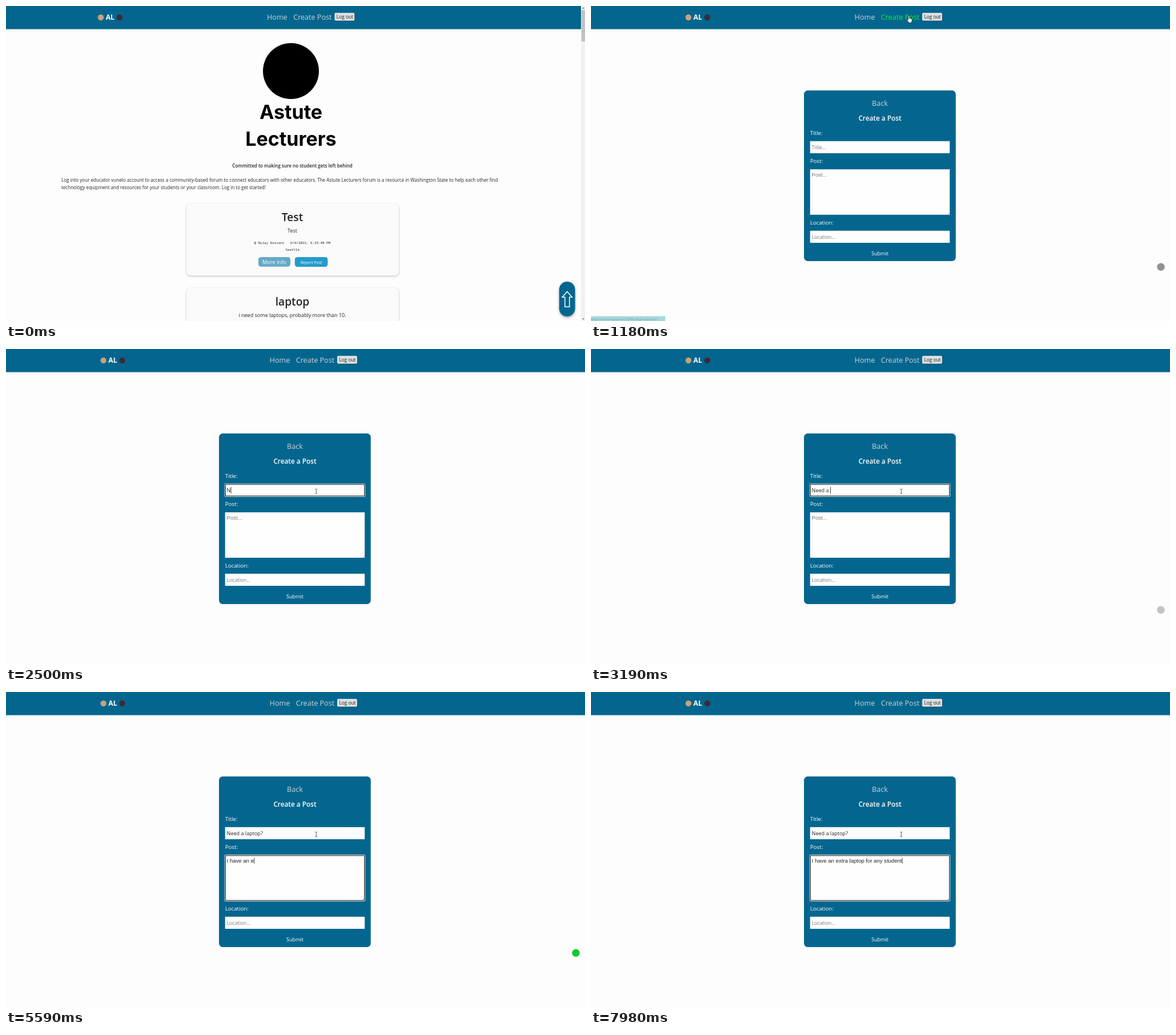
These frames come from a looping animation (1014 px wide and 552 px high, 8000 ms). An HTML page:

```html
<!DOCTYPE html>
<html lang="en">
<head>
<meta charset="utf-8">
<title>Forum walkthrough</title>
<style>
  html, body { margin: 0; width: 100%; height: 100%; overflow: hidden; background: #fdfdfd; }
  svg { display: block; width: 1014px; height: 552px; }
  text { font-family: "Open Sans", "Noto Sans", sans-serif; white-space: pre; }
  .mid { text-anchor: middle; }
  .link { font-size: 12.6px; fill: #ccd3d8; }
  .small { font-size: 8.06px; fill: #212529; }
  .h { font-size: 19.2px; font-weight: 600; fill: #212529; }
  .sub { font-size: 9.03px; fill: #212529; }
  .mono { font: 5.85px "Noto Sans Mono", "Liberation Mono", monospace; fill: #212529; }
  .big { font: 700 34px Inter, "Open Sans", sans-serif; fill: #000; }
  .label { font-size: 9.7px; font-weight: 500; fill: #fff; }
  .field { font-size: 9.05px; fill: #222; }
  .area { font: 9.57px "Liberation Sans", Arial, sans-serif; fill: #222; }
  .hint { fill: #777; }
  .card { fill: #fafafa; filter: drop-shadow(0 1.5px 1.5px rgba(0,0,0,.28)); }
</style>
</head>
<body>
<svg viewBox="0 0 1014 552">
  <rect width="1014" height="552" fill="#fdfdfd"/>
  <rect width="1014" height="40.6" fill="#04668e"/>

  <g id="nav">
    <circle cx="166" cy="20" r="5.2" fill="#c8a27b"/>
    <text x="174.7" y="24.3" font-size="12.2" font-weight="700" fill="#fff">AL</text>
    <circle cx="199" cy="20" r="5.2" fill="#3d2a34"/>
    <text class="link" x="457" y="24.4">Home</text>
    <text class="link" id="create" x="503.2" y="24.4">Create Post</text>
    <rect x="575.6" y="12.3" width="35.6" height="14.2" rx="2" fill="#27404c"/>
    <rect x="575.4" y="12.1" width="35" height="13.6" rx="2" fill="#dcdfe1"/>
    <text class="mid" x="593.4" y="22.4" font-size="8.3" fill="#222">Log out</text>
  </g>

  <g id="home">
    <circle cx="499" cy="114" r="49" fill="#000"/>
    <text class="big mid" x="499" y="197.5">Astute</text>
    <text class="big mid" x="499" y="244.8">Lecturers</text>
    <text class="small mid" x="501.5" y="282.5" font-weight="600">Committed to making sure no student gets left behind</text>
    <text class="small" x="97" y="308.3">Log into your educator vunelo account to access a community-based forum to connect educators with other educators. The Astute Lecturers forum is a resource in Washington State to help each other find</text>
    <text class="small" x="97" y="321.2">technology equipment and resources for your students or your classroom. Log in to get started!</text>

    <rect class="card" x="316" y="346" width="372" height="126.5" rx="7"/>
    <text class="h mid" x="501.5" y="377.3">Test</text>
    <text class="sub mid" x="501.5" y="396.6">Test</text>
    <text class="mono" x="434.6" y="416.6">@ Nilay Dorvani</text>
    <text class="mono" x="498" y="416.6">6/9/2022, 6:29:40 PM</text>
    <text class="mono mid" x="501.5" y="428.6">Seattle</text>
    <rect x="442" y="440" width="56" height="16.8" rx="4.5" fill="#63aac7"/>
    <text class="mid" x="470" y="451.8" font-size="9.2" fill="#fff">More Info</text>
    <rect x="505.8" y="440" width="57.6" height="17" rx="4.5" fill="#259bcd"/>
    <text class="mid" x="534.6" y="451.6" font-size="6.95" fill="#fff">Report Post</text>

    <rect class="card" x="316" y="494" width="372" height="126.5" rx="7"/>
    <text class="h mid" x="501.5" y="525">laptop</text>
    <text class="sub mid" x="501.5" y="544.6">i need some laptops, probably more than 10.</text>

    <rect x="968.8" y="483" width="27.8" height="61" rx="13.9" fill="#04668e" style="filter:drop-shadow(0 2px 2px rgba(0,0,0,.35))"/>
    <path d="M982.8 500.5l8.6 9.7h-4.6v17h-8v-17h-4.6z" fill="none" stroke="#fff" stroke-width="1.5"/>

    <rect x="1007" width="7" height="552" fill="#f1f1f1"/>
    <rect x="1007.8" y="7" width="6.2" height="55" fill="#c1c1c1"/>
    <path d="M1009 4.5l2-2.2 2 2.2zM1009 547.5l2 2.2 2-2.2z" fill="#666"/>
  </g>

  <g id="form">
    <rect x="373" y="148" width="265.8" height="299" rx="6.5" fill="#04668e"/>
    <text class="link mid" x="506" y="174.6">Back</text>
    <text class="mid" x="506" y="201.2" font-size="11.8" font-weight="600" fill="#fff">Create a Post</text>
    <text class="label" x="383.7" y="226.2">Title:</text>
    <text class="label" x="383.7" y="275.4">Post:</text>
    <text class="label" x="383.7" y="383">Location:</text>
    <g fill="#fefefe">
      <rect x="383.7" y="236.8" width="244.5" height="21.2"/>
      <rect x="383.7" y="286.2" width="244.5" height="79.6"/>
      <rect x="383.7" y="393.8" width="244.5" height="21.2"/>
    </g>
    <path d="M624.5 365l3-3M626.3 365l1.2-1.2" stroke="#888" stroke-width=".6"/>
    <g id="ring" fill="none">
      <rect id="outer" x="383.2" width="245.6" rx="1.2" stroke="#fff"/>
      <rect id="inner" x="384.2" width="243.6" rx=".8" stroke="#111" stroke-width="1.1"/>
    </g>
    <text id="title" x="386.6" y="251"></text>
    <text id="body" x="386.6" y="298.8"></text>
    <text class="field hint" x="386.6" y="408.3" style="font-size:8.7px">Location...</text>
    <rect id="caret" width=".8" fill="#111"/>
    <text class="mid" x="506" y="436.8" font-size="9.1" fill="#fff">Submit</text>
  </g>

  <g id="status">
    <rect y="543.6" width="130" height="8.4" fill="#a6d8dd"/>
    <text x="-2.5" y="550.6" font-size="5.75" fill="#6f9da2">https://astute-lecturers-5281c.example/post</text>
  </g>

  <circle id="badge" cy="457.3" r="6.7"/>
  <circle id="halo" r="6.6" fill="#e3e312"/>
  <g id="cursor">
    <path id="arrow" d="M0 0v8.6l2-1.9 1.4 3.1 1.5-.7-1.4-3 2.7-.1z" fill="#fff" stroke="#111" stroke-width=".7"/>
    <path id="hand" d="M-1 .8q1-1.5 2 0v3.8q1.2-.7 1.7.3 1.2-.5 1.6.5 1.2-.3 1.4.8v2.6q0 1.2-1 2.6v1h-5v-1l-3-4.2q.2-1.6 1.6-.5l.7.8z" fill="#fff" stroke="#111" stroke-width=".7"/>
    <path id="beam" d="M-1.8-4q1.8 0 1.8.8 0-.8 1.8-.8M0-3.2v6.8M-1.8 4.4q1.8 0 1.8-.8 0 .8 1.8 .8" fill="none" stroke="#333" stroke-width=".8"/>
  </g>
</svg>
<script>
const LOOP = 8000, SWITCH = 1180, FOCUS = 1990, TAB = 4180;
const $ = id => document.getElementById(id);
const set = (id, attrs) => { for (const k in attrs) $(id).setAttribute(k, attrs[k]); };
const show = (id, on) => { $(id).style.display = on ? "" : "none"; };
const ramp = (t, a, b) => Math.min(1, Math.max(0, (t - a) / (b - a)));
const smooth = u => u * u * (3 - 2 * u);

// Each row: time, value, value...
const path = [
  [360, 700, 562], [800, 575.8, 23], [1130, 556.4, 17], [1260, 556.4, 17],
  [1660, 539.6, 259.5], [1830, 539.6, 259.5], [1960, 543.3, 249.4]
];
const titleKeys = [[2410, 1], [3100, 7], [3220, 8], [3310, 9], [3540, 10], [3790, 13], [4020, 14]];
const bodyKeys = [[4810, 1], [5590, 11], [5720, 12], [6480, 22], [6550, 23], [6800, 24], [7580, 34], [7640, 35], [7980, 38]];

function sample(keys, t, ease = u => u) {
  const i = keys.findIndex(k => k[0] > t);
  if (i < 0) return keys[keys.length - 1].slice(1);
  if (i === 0) return keys[0].slice(1);
  const a = keys[i - 1], b = keys[i], u = ease(ramp(t, a[0], b[0]));
  return a.slice(1).map((v, n) => v + (b[n + 1] - v) * u);
}

const typed = (text, keys, t) =>
  t < keys[0][0] ? "" : text.slice(0, Math.floor(sample(keys, t)[0] + 1e-6));

function fill(id, text, hint, cls) {
  const el = $(id);
  el.textContent = text || hint;
  el.setAttribute("class", cls + (text ? "" : " hint"));
  return text ? el.getComputedTextLength() : 0;
}

function drawForm(t) {
  const titleW = fill("title", typed("Need a laptop?", titleKeys, t), "Title...", "field");
  const bodyW = fill("body", typed("I have an extra laptop for any student", bodyKeys, t), "Post...", "area");
  const inBody = t >= TAB, top = inBody ? 286.2 : 236.8, h = inBody ? 79.6 : 21.2;
  show("ring", t >= FOCUS);
  show("caret", t >= FOCUS);
  set("outer", { y: top - .5, height: h + 1 });
  set("inner", { y: top + .5, height: h - 1 });
  set("caret", { x: 386.8 + (inBody ? bodyW : titleW), y: inBody ? 290.6 : 241.8, height: inBody ? 10 : 11.4 });
}

function drawCursor(t, form) {
  const [x, y] = sample(path, t, smooth);
  const overLink = y < 27 && x > 503 && x < 574 + (form ? 5 : 0);
  const overText = form && x > 384 && x < 628 && y > 237 && y < 258;
  const kind = overText ? "beam" : y < 27 && x > 503 && x < 616 ? "hand" : "arrow";
  ["arrow", "hand", "beam"].forEach(k => show(k, k === kind));
  show("cursor", t >= 360);
  set("cursor", { transform: `translate(${x} ${y})` });
  $("create").style.fill = overLink ? "#0af03c" : "";
  const click = t < 1900 ? ramp(t, 1640, 1680) * (1 - ramp(t, 1780, 1850))
    : t >= FOCUS ? 1 - ramp(t, FOCUS, 2080) : 0;
  set("halo", { cx: x + .2, cy: y + .5, opacity: .75 * click });
}

function drawBadge(t, form) {
  const first = ramp(t, 450, 650) * (1 - ramp(t, 1250, 1600));
  const second = ramp(t, 3050, 3310) * (1 - ramp(t, 7500, 7950));
  const g = ramp(t, TAB, 4420) * (1 - ramp(t, 6800, 7400));
  const mix = (a, b) => Math.round(a + (b - a) * g);
  set("badge", {
    cx: form ? 998 : 989,
    opacity: t < 2500 ? first : second,
    fill: `rgb(${mix(146, 20)},${mix(146, 200)},${mix(146, 45)})`
  });
}

function render(t) {
  const form = t >= SWITCH;
  show("home", !form);
  show("form", form);
  set("nav", { transform: `translate(${form ? 4.6 : 0} 0)` });
  show("status", form);
  set("status", { opacity: 1 - ramp(t, 1300, 1550) });
  if (form) drawForm(t);
  drawCursor(t, form);
  drawBadge(t, form);
}

const start = performance.now();
function tick() {
  render((performance.now() - start) % LOOP);
  requestAnimationFrame(tick);
}
tick();
</script>
</body>
</html>
```
